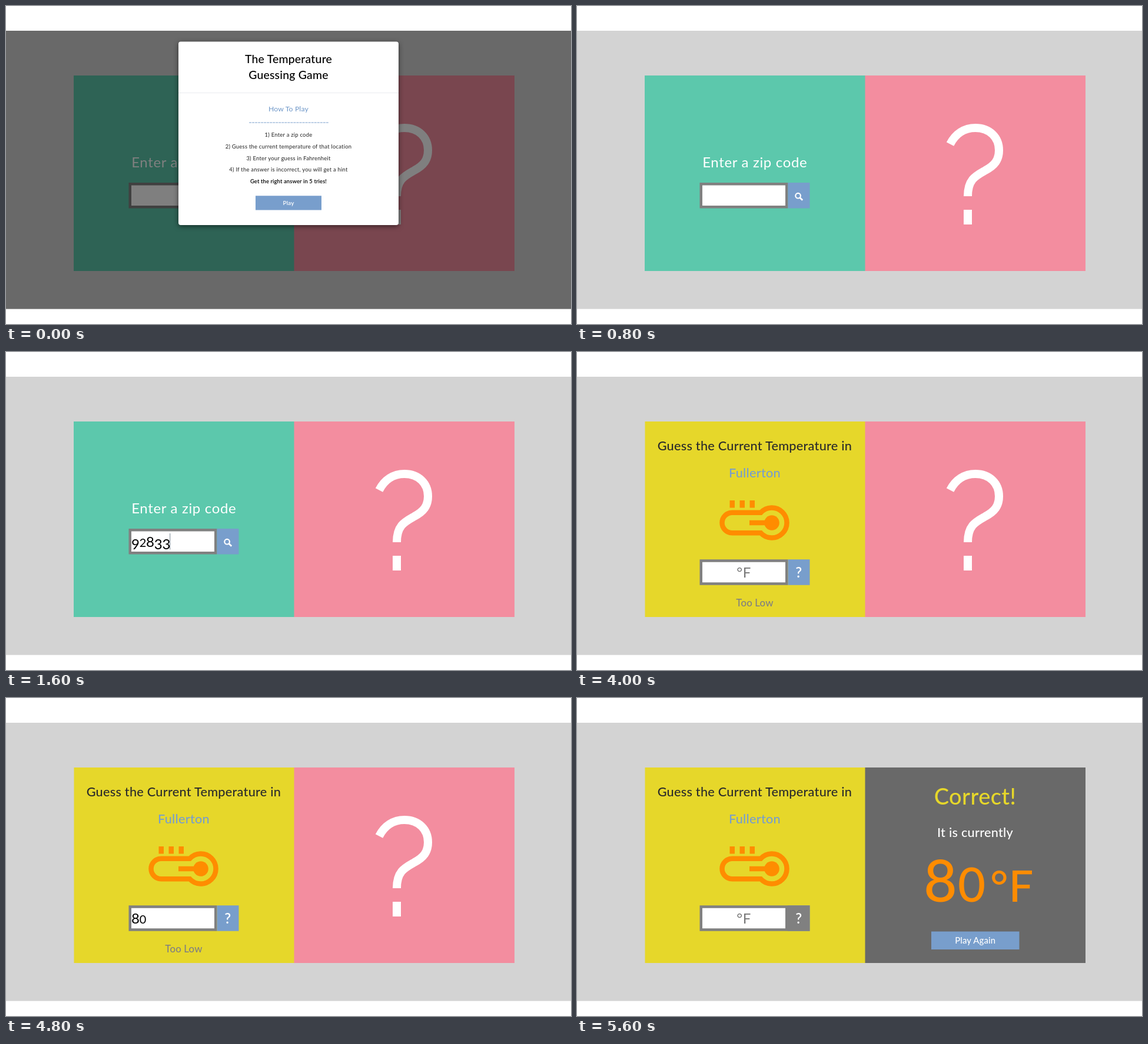
Write an HTML page that moves like this. It is 960 px wide and 540 px high and loops after 6400 ms.

```html
<!DOCTYPE html>
<html lang="en">
<head>
<meta charset="utf-8">
<title>The Temperature Guessing Game</title>
<style>
  html, body { margin: 0; height: 100%; overflow: hidden; background: #fff; }
  svg { display: block; width: 100vw; height: 100vh; }
  text { font-family: Lato, "Open Sans", sans-serif; letter-spacing: .028em; text-anchor: middle; }
  .medium { font-weight: 500; letter-spacing: .012em; }
  .bold { font-weight: 600; letter-spacing: .015em; }
  .entry { font-size: 24px; letter-spacing: -.01em; text-anchor: start; }
  .blue { fill: #789ecc; }
  .white { fill: #fff; }
  .gray { fill: #808080; }
  .orange { fill: #ff8c00; }
  .yellow { fill: #e6d72a; }
  .modal { filter: drop-shadow(0 2px 4px rgba(0, 0, 0, .55)); }
</style>
</head>
<body>
<svg viewBox="0 0 960 540">
  <defs>
    <g id="field">
      <path class="gray" d="M208.5 0h150v43.5h-150z"/>
      <path class="white" d="M213 4.5h141v34.5h-141z"/>
    </g>
  </defs>
  <path fill="#d3d3d3" d="M0 42h960v472.5H0z"/>

  <!-- zip code panel -->
  <g data-steps="012">
    <path fill="#5cc8ac" d="M115 118h375v332H115z"/>
    <text class="white" x="302.3" y="274" font-size="24">Enter a zip code</text>
    <use href="#field" y="300"/>
    <path class="blue" d="M358.5 300h37v43.5h-37z"/>
    <g fill="none" stroke="#fff">
      <circle cx="375.6" cy="322.2" r="4.3" stroke-width="2.2"/>
      <path d="M378.8 325.4l4.4 4.4" stroke-width="2.8"/>
    </g>
  </g>
  <g data-steps="2">
    <text class="entry" x="213" y="331" data-digits="92833"/>
    <path d="M278.7 308v27.500" stroke="#567" stroke-width=".8"/>
  </g>

  <!-- guessing panel -->
  <g data-steps="34567">
    <path class="yellow" d="M115.500 118H490v332H115.500z"/>
    <text class="medium" x="302" y="167" font-size="21.7" fill="#2b2b2b">Guess the Current Temperature in</text>
    <text class="medium blue" x="302" y="212.500" font-size="21.7">Fullerton</text>
    <path fill="none" stroke="#ff8c00" stroke-width="8.500"
      d="M312.300 272.700H263.800a17.300 17.300 0 0 0 0 34.600H312.300A25.500 25.500 0 1 0 312.300 272.700z"/>
    <circle class="orange" cx="331" cy="290" r="12.800"/>
    <path class="orange" d="M259.500 252h8.500v12.500h-8.500zm17 0h8.500v12.500h-8.500zm17 0h8.500v12.500h-8.500zM293 285.700h38v8.500h-38z"/>
    <use href="#field" y="352.300"/>
    <path class="blue" d="M358.500 352.300h37v43.500h-37z"/>
  </g>
  <path class="orange" data-steps="34" d="M259.500 285.700h36v8.500h-36z"/>
  <path class="gray" data-steps="7" d="M358 352.300h37.500v43.500H358z"/>
  <text class="bold white" data-steps="34567" x="377" y="383" font-size="24">?</text>
  <text data-steps="357" x="283.700" y="383" font-size="24" fill="#777">°F</text>
  <text class="entry" data-steps="4" x="213" y="383" data-digits="70"/>
  <text class="entry" data-steps="6" x="213" y="383" data-digits="80"/>
  <text class="medium gray" data-steps="56" x="302" y="432" font-size="16.800">Too Low</text>

  <!-- answer panel -->
  <g data-steps="0123456">
    <path fill="#f38d9f" d="M489.500 118H864v332H489.500z"/>
    <path fill="none" stroke="#fff" stroke-width="14"
      d="M634 234.500C643 217 658 207 677 207C701 207 717 223 717 245C717 262 709 271 694 279C678 288 664 294 664 323M664 346v25"/>
  </g>
  <g data-steps="7">
    <path fill="#696969" d="M489.500 118H864v332H489.500z"/>
    <text class="medium yellow" x="676.500" y="181" font-size="38">Correct!</text>
    <text class="medium white" x="676.500" y="236" font-size="21.700">It is currently</text>
    <text class="medium orange" style="text-anchor:start" x="589" y="346" font-size="98" data-digits="80"/>
    <text class="medium orange" style="text-anchor:start" x="702" y="346" font-size="74">°F</text>
    <path class="blue" d="M602 396.500h149.500v30.500H602z"/>
    <text class="medium white" x="676.700" y="417" font-size="14.800">Play Again</text>
  </g>

  <!-- instructions -->
  <g data-steps="0">
    <path fill-opacity=".5" d="M0 42h960v472.500H0z"/>
    <rect class="modal white" x="293" y="60.500" width="374" height="311.500" rx="4"/>
    <path d="M293 147.500h374" stroke="#e9ecef"/>
    <text class="medium" x="480" y="97" font-size="19.400">The Temperature</text>
    <text class="medium" x="480" y="124" font-size="19.400">Guessing Game</text>
    <text class="medium blue" x="480" y="179" font-size="12.200">How To Play</text>
    <path d="M413 198h135" stroke="#789ecc" stroke-width="1.200" stroke-dasharray="4 1.030"/>
    <g font-size="9.400" fill="#222">
      <text x="480" y="222">1) Enter a zip code</text>
      <text x="480" y="241.500">2) Guess the current temperature of that location</text>
      <text x="480" y="261.500">3) Enter your guess in Fahrenheit</text>
      <text x="480" y="281">4) If the answer is incorrect, you will get a hint</text>
      <text class="bold" x="480" y="301" fill="#000">Get the right answer in 5 tries!</text>
    </g>
    <path class="blue" d="M424 322.300h112v24.200H424z"/>
    <text class="bold white" x="480" y="338" font-size="9.800">Play</text>
  </g>
</svg>
<script>
const STEP = 800, STEPS = 8;
const parts = [...document.querySelectorAll('[data-steps]')];

// Old-style figures: 0-2 are small, 3, 4, 5, 7 and 9 hang below the baseline.
function setDigits(el) {
  let drop = 0;
  for (const digit of el.dataset.digits) {
    const span = document.createElementNS('http://www.w3.org/2000/svg', 'tspan');
    const next = '34579'.includes(digit) ? .17 : 0;
    const scale = '012'.includes(digit) ? .83 : 1;
    span.textContent = digit;
    span.setAttribute('font-size', scale + 'em');
    span.setAttribute('dy', (next - drop) / scale + 'em');
    drop = next;
    el.append(span);
  }
}

function draw(now) {
  const step = Math.floor(now / STEP) % STEPS;
  for (const part of parts)
    part.style.display = part.dataset.steps.includes(step) ? '' : 'none';
}

document.querySelectorAll('[data-digits]').forEach(setDigits);
const start = performance.now();
function tick() {
  draw(performance.now() - start);
  requestAnimationFrame(tick);
}
tick();
</script>
</body>
</html>
```
